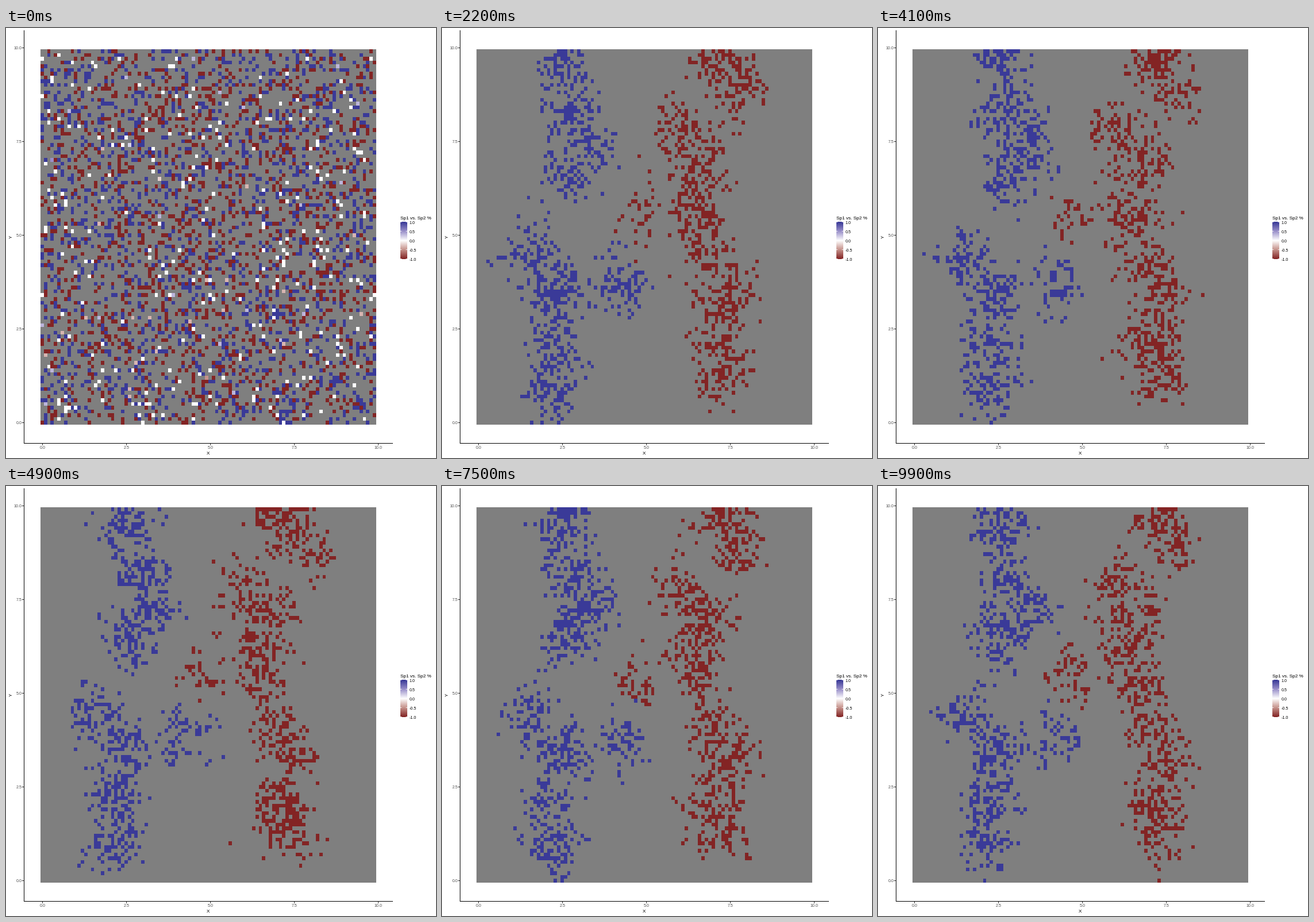
A matplotlib script that plays this animation: 748x748 px, repeating every 10000 ms.

```python
import numpy as np
import matplotlib.pyplot as plt
from matplotlib.animation import FuncAnimation
from matplotlib.colors import LinearSegmentedColormap
from matplotlib.patches import Rectangle

SIZE, DPI, FRAMES, N = 748, 100, 100, 100
LEFT, RIGHT, TOP, BOTTOM = 60, 644, 37, 690
START, STABLE = 1900, 750      # agents per species
REACH, SPREAD = 6, 1.6         # habitat radius and dispersal, in cells

# Rough centres of good habitat, in axis units
BLUE_HOMES = [(2.6, 9.5), (2.8, 8.2), (3.4, 7.3), (2.7, 6.6), (1.5, 4.4),
              (2.4, 3.5), (4.3, 3.7), (2.2, 2.2), (2.2, 1.0)]
RED_HOMES = [(7.2, 9.7), (7.8, 8.9), (5.9, 7.7), (6.7, 7.1), (6.4, 6.2),
             (6.6, 5.4), (4.6, 5.4), (7.0, 4.1), (7.5, 3.3), (7.1, 2.1),
             (7.3, 1.4)]

cmap = LinearSegmentedColormap.from_list(
    "species", ["#832424", "#c5918a", "#ffffff", "#9b91ca", "#3a3a98"])

cells = np.arange(N)
near = (np.abs(cells[:, None] - cells) <= 3).astype(float)


def count(pos):
    """Agents per cell, indexed [row, column]."""
    grid = np.zeros((N, N))
    col, row = pos.astype(int).T
    np.add.at(grid, (row, col), 1)
    return grid


def fitness(pos, homes, niche):
    gap = pos[:, None] - (10 * np.array(homes) + 0.5)
    d2 = (gap ** 2).sum(axis=2).min(axis=1)
    offset = (pos[:, 0] - niche) / 24
    return np.exp(-d2 / (2 * REACH ** 2) - offset ** 2 / 2)


def evolve(homes, niche, rng):
    """Birth, dispersal and crowding; selection sharpens over 20 steps."""
    pos = rng.uniform(0, N, (START, 2))
    history = [count(pos)]
    for t in range(1, FRAMES):
        crowd = near @ history[-1] @ near
        col, row = pos.astype(int).T
        weight = fitness(pos, homes, niche) ** min(1, (t / 20) ** 2)
        weight /= 1 + crowd[row, col] / 15
        size = int(STABLE + (START - STABLE) * np.exp(-t / 4))
        parents = rng.choice(len(pos), size, p=weight / weight.sum())
        pos = pos[parents] + rng.normal(0, SPREAD, (size, 2))
        pos = np.abs(pos)
        pos = np.clip(N - np.abs(N - pos), 0, N - 0.01)
        history.append(count(pos))
    return history


blue = evolve(BLUE_HOMES, 27, np.random.default_rng(3))
red = evolve(RED_HOMES, 70, np.random.default_rng(8))


def field(t):
    total = blue[t] + red[t]
    share = (blue[t] - red[t]) / np.maximum(total, 1)
    return np.ma.masked_where(total == 0, share)


fig = plt.figure(figsize=(SIZE / DPI, SIZE / DPI), dpi=DPI, facecolor="white")
ax = fig.add_axes([0, 0, 1, 1])
ax.axis("off")


def line(x, y, color="black", width=1.0):
    ax.plot(x, y, color=color, lw=width * 72 / DPI, snap=False,
            solid_capstyle="butt")


def label(x, y, text, px=7.1, color="black", ha="left", **kw):
    ax.text(x, y, text, fontsize=px * 72 / DPI, color=color, ha=ha,
            family="Liberation Sans", **{"va": "center_baseline", **kw})


ax.add_patch(Rectangle((LEFT, TOP), RIGHT - LEFT, BOTTOM - TOP, lw=0,
                       color="#7f7f7f", antialiased=False, zorder=-1))
image = ax.imshow(field(0), cmap=cmap, vmin=-1, vmax=1, origin="lower",
                  extent=(LEFT, RIGHT, BOTTOM, TOP), aspect="auto",
                  interpolation="nearest")

# Axes
line([31.5, 31.5], [4, 723])
line([31, 673], [722.5, 722.5])
for v in np.arange(0, 10.1, 2.5):
    px, py = round(63 + 58.4 * v) + 0.5, round(686.5 - 65.3 * v) + 0.5
    line([px, px], [723, 726], "#333333")
    line([28, 31], [py, py], "#333333")
    label(px, 730, f"{v:.1f}", color="#4d4d4d", ha="center")
    label(28, py, f"{v:.1f}", color="#4d4d4d", ha="right")
label(352, 740, "X", 8.25, ha="center")
label(9, 363, "Y", 8.25, ha="center", va="center", rotation=90)

# Colour bar
label(686, 330, "Sp1 vs. Sp2 %", 8.25)
ax.imshow(np.linspace(1, -1, 65)[:, None], cmap=cmap, vmin=-1, vmax=1,
          extent=(686, 698, 402, 337), aspect="auto", interpolation="nearest")
for v in np.linspace(1, -1, 5):
    y = 369.5 - 32 * v
    for x in (686, 695.6):
        line([x, x + 2.4], [y, y], "white", 0.8)
    label(702, y + 0.5, f"{v:.1f}")

ax.set_xlim(0, SIZE)
ax.set_ylim(SIZE, 0)


def update(t):
    image.set_data(field(t))
    return [image]


anim = FuncAnimation(fig, update, frames=FRAMES, interval=100,
                     repeat=True, repeat_delay=0, blit=False)
plt.show()
```
